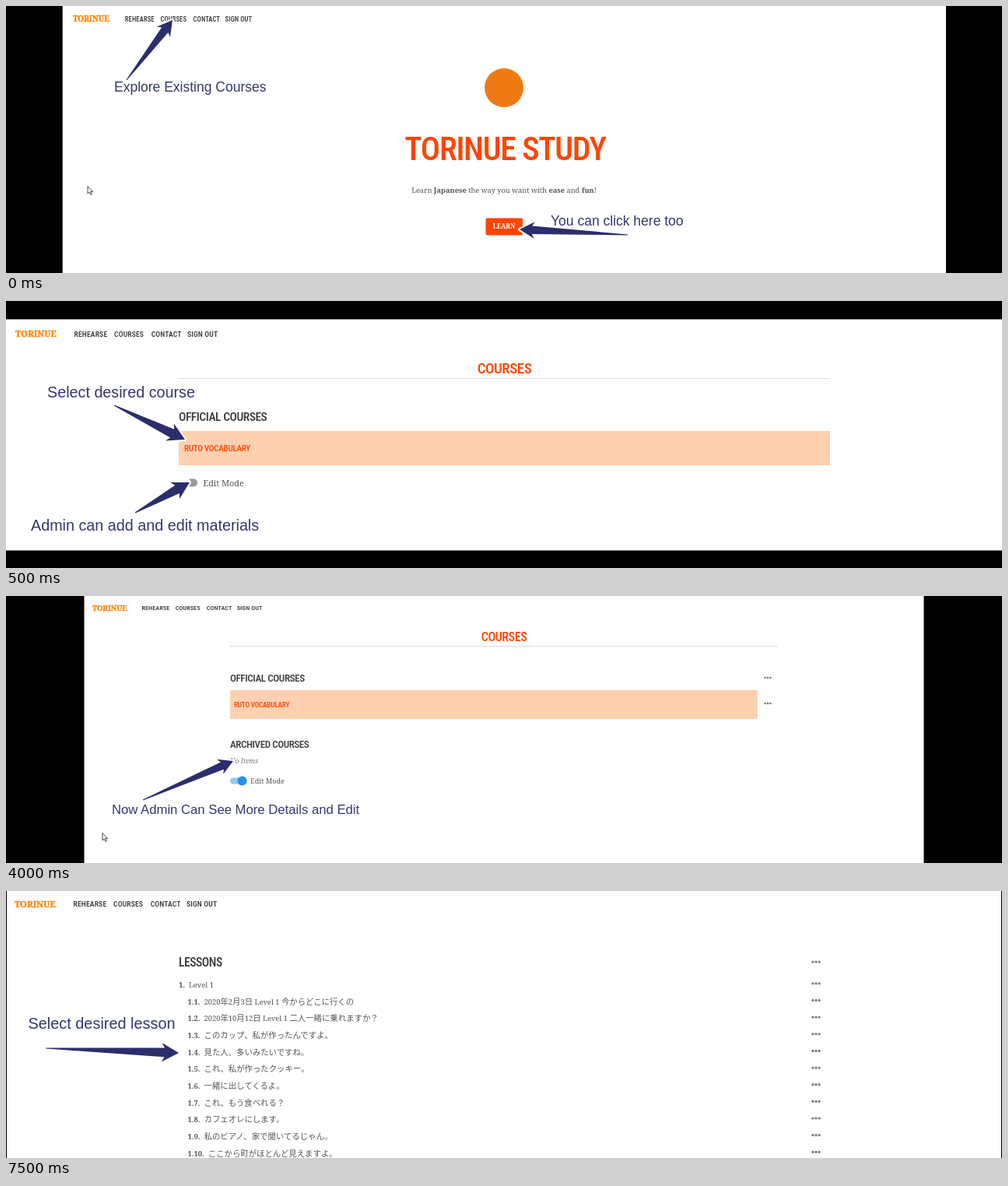
Recreate the animation shown at these times as an HTML page. Size 1280 by 343 pixels, loop 8000 ms.

```html
<!DOCTYPE html>
<html lang="en">
<head>
<meta charset="utf-8">
<title>Course walkthrough</title>
<style>
  html, body { margin: 0; width: 100%; height: 100%; overflow: hidden; background: #000; }
  svg { display: block; width: 100%; height: 100%; }
  .scene { display: none; }
  .scene.on { display: inline; }
  text { white-space: pre; }
  .head, .nav { font-family: "Roboto Condensed", Roboto, sans-serif; font-stretch: 75%; font-weight: 500; }
  .head { letter-spacing: -.03em; }
  .nav { letter-spacing: .02em; fill: #333; }
  .brand { font-family: "Noto Serif", serif; font-weight: 900; fill: #ff8a14; stroke: #ff8a14; stroke-width: .5; }
  .body { font-family: "Noto Serif", "Noto Sans CJK JP", serif; fill: #555; }
  .note { font-family: "Liberation Sans", Arial, sans-serif; fill: #34366f; }
  .ja { font-family: "Noto Sans CJK JP", "Noto Sans CJK", sans-serif; font-size: 10.4px; }
  .b { font-weight: 700; }
  .orange { fill: #ff4500; }
  .dark { fill: #3a3a3a; }
  .arrow { fill: #2c2e6c; stroke: #fff; stroke-width: 4; stroke-linejoin: round; paint-order: stroke; }
</style>
</head>
<body>
<svg id="stage" viewBox="0 0 1280 343" preserveAspectRatio="none"></svg>
<script>
const text = (cls, x, y, size, str, extra = '') =>
  `<text class="${cls}" x="${x}" y="${y}" font-size="${size}" ${extra}>${str}</text>`;
const middle = 'text-anchor="middle"';
const rect = (x, y, w, h, fill, r = 0) =>
  `<rect x="${x}" y="${y}" width="${w}" height="${h}" rx="${r}" fill="${fill}"/>`;
const circle = (x, y, r, fill) => `<circle cx="${x}" cy="${y}" r="${r}" fill="${fill}"/>`;
const rule = (x1, x2, y) =>
  `<path d="M${x1} ${y}H${x2}" stroke="#bbb" stroke-dasharray="1 1" fill="none"/>`;
const dots = (x, y, s) =>
  [-1, 0, 1].map(i => circle(x + i * 4.1 * s, y, 1.6 * s, '#777')).join('');

function navBar(x, y, s) {
  const links = [['REHEARSE', 75.5], ['COURSES', 127], ['CONTACT', 174.7], ['SIGN OUT', 221]];
  return text('brand', x, y + 4.2 * s, 11.2 * s, 'TORINUE') +
    links.map(([label, dx]) => text('nav', x + dx * s, y + 3.5 * s, 9.6 * s, label)).join('');
}

// Tapered arrow with a swept-back head, scaled to its label size.
function arrow(x1, y1, x2, y2, size) {
  const len = Math.hypot(x2 - x1, y2 - y1);
  const ux = (x2 - x1) / len, uy = (y2 - y1) / len;
  const at = (back, side) =>
    `${x2 - ux * back * size - uy * side * size},${y2 - uy * back * size + ux * side * size}`;
  const half = [[len / size, .03], [.92, .3], [1.1, .62]];
  const points = [
    ...half.map(([back, side]) => at(back, -side)),
    at(0, 0),
    ...half.reverse().map(([back, side]) => at(back, side))
  ];
  return `<polygon class="arrow" points="${points.join(' ')}"/>`;
}

const cursor = (x, y) =>
  `<path transform="translate(${x} ${y})" d="M0 0V9.5L2.2 7.6L3.8 11L5.4 10.2L3.8 7H6.6Z" fill="#fff" stroke="#333" stroke-width=".9"/>`;

const home = () =>
  rect(72.7, 0, 1135.3, 343, '#fff') + navBar(86, 16.5, .885) +
  circle(640, 105, 25, '#ef7a13') +
  text('head orange', 641.5, 198, 42, 'TORINUE STUDY', middle) +
  text('body', 640, 239.5, 9.25,
    'Learn <tspan class="b">Japanese</tspan> the way you want with <tspan class="b">ease</tspan> and <tspan class="b">fun</tspan>!', middle) +
  rect(616.5, 272.5, 47.5, 22, '#ff4500', 2) +
  text('body b', 640, 286.3, 8, 'LEARN', middle + ' style="fill:#fff"') +
  arrow(155, 95, 214, 18, 17.5) + text('note', 139, 109.5, 17.5, 'Explore Existing Courses') +
  arrow(799, 294, 660, 287, 17.5) + text('note', 700, 281.5, 17.5, 'You can click here too') +
  cursor(105, 231.5);

const courses = () =>
  rect(0, 23.5, 1280, 297, '#fff') + navBar(12, 42, 1) +
  text('head orange', 640.5, 92.5, 19.2, 'COURSES', middle) + rule(222, 1059, 99.5) +
  text('head dark', 222, 154, 15.5, 'OFFICIAL COURSES') +
  rect(222, 167, 837, 44, '#ffd0b0') +
  text('head orange', 229, 192.6, 11.2, 'RUTO VOCABULARY') +
  rect(229, 228.5, 17, 10, '#999', 5) + circle(230, 233.5, 7, '#fff') +
  text('body', 253.5, 237.7, 10.8, 'Edit Mode') +
  arrow(139, 134, 230, 178, 19.75) + text('note', 53, 124, 19.75, 'Select desired course') +
  arrow(166, 272, 236, 233, 19.75) + text('note', 32, 295, 19.75, 'Admin can add and edit materials');

const editing = () =>
  rect(100.5, 0, 1079, 343, '#fff') + navBar(111, 15.5, .84) +
  text('head orange', 640, 58, 16.2, 'COURSES', middle) + rule(288, 992, 64.5) +
  text('head dark', 288, 110, 13.1, 'OFFICIAL COURSES') + dots(979, 105, .84) +
  rect(288, 121, 678, 37, '#ffd0b0') + dots(979, 138, .84) +
  text('head orange', 293, 143, 9.4, 'RUTO VOCABULARY') +
  text('head dark', 288, 194.5, 13, 'ARCHIVED COURSES') +
  text('body', 288, 215, 8.6, 'No Items', 'font-style="italic" style="fill:#777"') +
  rect(288, 233.5, 19, 8, '#90caf9', 4) + circle(303.5, 237.5, 6, '#2190ee') +
  text('body', 314, 241, 9.1, 'Edit Mode') +
  arrow(176, 262, 292, 212, 16.7) + text('note', 136, 280, 16.7, 'Now Admin Can See More Details and Edit') +
  cursor(124, 304.5);

function lessons() {
  const titles = [
    'Level 1', '2020年2月3日 Level 1 今からどこに行くの', '2020年10月12日 Level 1 二人一緒に乗れますか？',
    'このカップ、私が作ったんですよ。', '見た人、多いみたいですね。', 'これ、私が作ったクッキー。',
    '一緒に出してくるよ。', 'これ、もう食べれる？', 'カフェオレにします。',
    '私のピアノ、家で聞いてるじゃん。', 'ここから町がほとんど見えますよ。'];
  const mixed = s => s.replace(/[^\x00-\x7f]+/g, run => `<tspan class="ja">${run}</tspan>`);
  const rows = titles.map((title, i) => {
    const y = 120.3 + i * 21.65;
    const label = `<tspan class="b">${i ? '1.' + i : 1}.</tspan>`;
    return text('body', i ? 233.5 : 222, y + 3.7, 9.4, `${label}<tspan dx="5">${mixed(title)}</tspan>`) +
      dots(1041, y - 1.5, 1);
  });
  return rect(1, 0, 1278, 343, '#fff') + navBar(11, 16.7, 1) +
    text('head dark', 222, 97, 15.6, 'LESSONS') + dots(1041, 91, 1) + rows.join('') +
    arrow(51, 202, 222, 208, 19.9) + text('note', 28.5, 177, 19.9, 'Select desired lesson');
}

const LOOP = 8000;
const steps = [[0, home], [500, courses], [4000, editing], [7500, lessons]];
const stage = document.getElementById('stage');
stage.innerHTML = steps.map(([, draw]) => `<g class="scene">${draw()}</g>`).join('');
const scenes = [...stage.children];
const start = performance.now();

function show(now) {
  const time = Math.max(0, now - start) % LOOP;
  const current = steps.filter(([from]) => from <= time).length - 1;
  scenes.forEach((scene, i) => scene.classList.toggle('on', i === current));
  requestAnimationFrame(show);
}
show(start);
</script>
</body>
</html>
```
